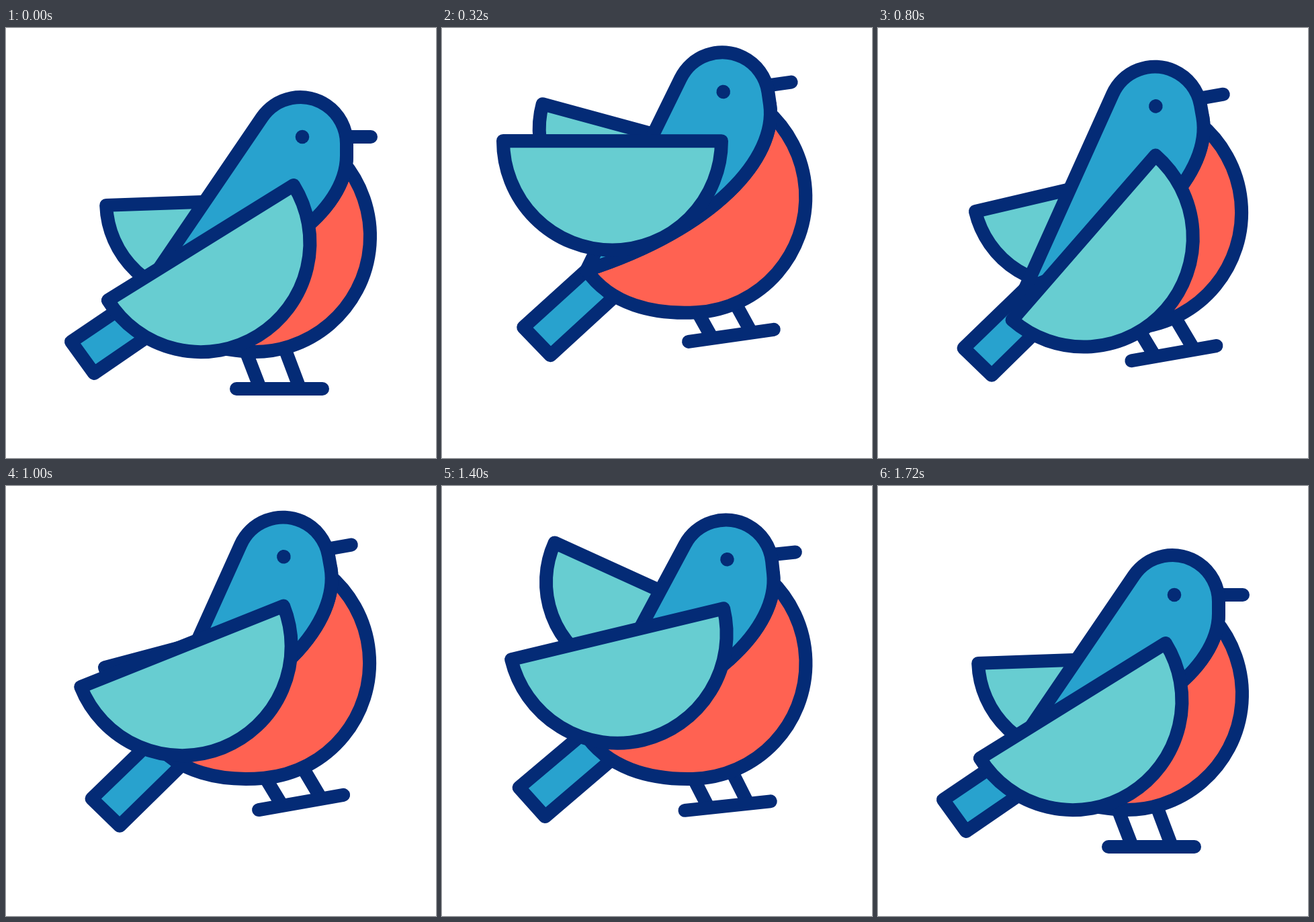
An HTML page with a canvas for the animation above (2000 ms loop, 640 by 640 pixels).

```html
<!DOCTYPE html>
<html lang="en">
<head>
<meta charset="utf-8">
<title>Flying bird</title>
<style>
html, body { margin: 0; width: 100%; height: 100%; overflow: hidden; background: #fff; }
canvas { display: block; width: 640px; height: 640px; }
</style>
</head>
<body>
<canvas id="stage" width="640" height="640"></canvas>
<script>
const ctx = document.getElementById('stage').getContext('2d');
const LOOP = 2000, STEP = 40, RAD = Math.PI / 180;
const NAVY = '#042b76', BLUE = '#28a2ce', TEAL = '#67cdd1', RED = '#ff6252';

// Each track is a list of [time, value] joined by sine easing.
const tracks = {
  lift:  [[20, 0], [445, -73], [870, -33], [1210, -76], [1650, 0]],
  tilt:  [[20, 0], [440, -10], [1210, -10], [1650, 0]],
  tuck:  [[20, 0], [445, 19], [870, 8], [1210, 18], [1650, 0]],
  front: [[20, -31.8], [391, 12], [758, -40], [1217, 12], [1611, -31.8]],
  back:  [[34, -2], [455, 31], [926, -10], [1275, 38], [1715, -2]]
};

function valueAt(keys, t) {
  if (t <= keys[0][0]) return keys[0][1];
  for (let i = 1; i < keys.length; i++) {
    const [t0, a] = keys[i - 1], [t1, b] = keys[i];
    if (t < t1) return a + (b - a) * (1 - Math.cos(Math.PI * (t - t0) / (t1 - t0))) / 2;
  }
  return keys[keys.length - 1][1];
}

function paint(fill) {
  ctx.fillStyle = fill;
  ctx.fill();
  ctx.stroke();
}

function line(x0, y0, x1, y1) {
  ctx.beginPath();
  ctx.moveTo(x0, y0);
  ctx.lineTo(x1, y1);
  ctx.stroke();
}

// Half disc hinged at its right corner.
function wing(x, y, r, angle) {
  ctx.save();
  ctx.translate(x, y);
  ctx.rotate(angle * RAD);
  ctx.beginPath();
  ctx.arc(-r, 0, r, 0, Math.PI);
  ctx.closePath();
  paint(TEAL);
  ctx.restore();
}

function tail() {
  ctx.beginPath();
  ctx.moveTo(202, 396);
  ctx.lineTo(97, 467);
  ctx.lineTo(131, 514);
  ctx.lineTo(236, 442);
  ctx.closePath();
  paint(BLUE);
}

function legs(tuck) {
  ctx.save();
  ctx.translate(-0.37 * tuck, -0.93 * tuck);
  line(355, 476, 377, 533);
  line(413, 472, 436, 533);
  line(343, 537, 471, 537);
  ctx.restore();
}

function belly() {
  ctx.beginPath();
  ctx.arc(370, 310, 172, -40.7 * RAD, 95 * RAD);
  ctx.bezierCurveTo(292, 476, 230, 452, 202, 396);
  ctx.bezierCurveTo(400, 362, 507, 270, 507, 190);
  ctx.closePath();
  paint(RED);
}

function head() {
  line(507, 162, 543, 162);
  ctx.beginPath();
  ctx.moveTo(202, 396);
  ctx.arc(438, 172, 69, Math.atan2(-0.563, -0.827), 0);
  ctx.lineTo(507, 190);
  ctx.bezierCurveTo(507, 270, 400, 362, 202, 396);
  ctx.closePath();
  paint(BLUE);
  ctx.beginPath();
  ctx.arc(441, 162, 10.3, 0, 2 * Math.PI);
  ctx.fillStyle = NAVY;
  ctx.fill();
}

function draw(t) {
  const at = name => valueAt(tracks[name], t);
  ctx.fillStyle = '#fff';
  ctx.fillRect(0, 0, 640, 640);
  ctx.save();
  ctx.strokeStyle = NAVY;
  ctx.lineWidth = 20;
  ctx.lineCap = ctx.lineJoin = 'round';
  ctx.translate(370, 315 + at('lift'));
  ctx.rotate(at('tilt') * RAD);
  ctx.translate(-370, -315);
  wing(432, 254, 141.5, at('back'));
  tail();
  legs(at('tuck'));
  belly();
  head();
  wing(428, 234, 162.5, at('front'));
  ctx.restore();
}

function tick() {
  const t = performance.now() % LOOP;
  draw(Math.floor(t / STEP) * STEP);
  requestAnimationFrame(tick);
}
tick();
</script>
</body>
</html>
```
